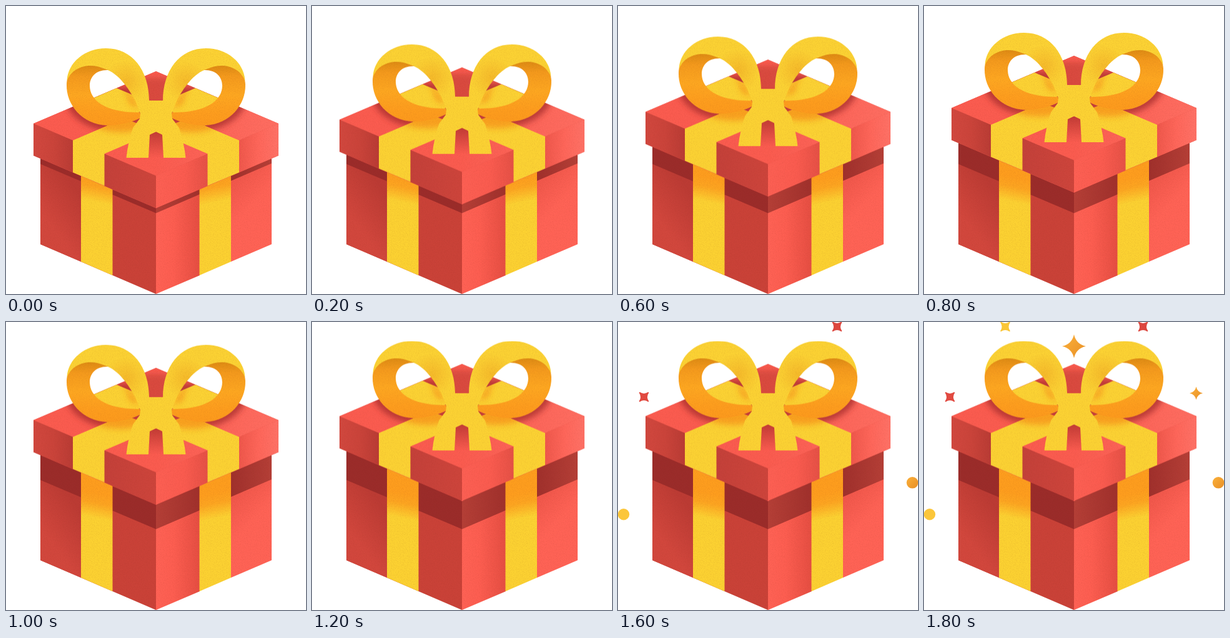
Animation, 480 px wide and 463 px high, one loop 2000 ms. Source, as an HTML page:

```html
<!DOCTYPE html>
<html lang="en">
<head>
<meta charset="utf-8">
<title>Gift box</title>
<style>
html, body { margin: 0; width: 100%; height: 100%; overflow: hidden; background: #fff; }
svg { display: block; width: 480px; height: 463px; }
.lid { animation: lift 2s infinite; }
.spark { animation: 2s step-end infinite; }
.a { animation-name: show-a; }
.b { animation-name: show-b; }
.c { animation-name: show-c; }
@keyframes lift {
  0% { transform: translateY(0); animation-timing-function: steps(6, end); }
  60%, 100% { transform: translateY(-37.5px); }
}
@keyframes show-a { 0% { opacity: 0; } 70%, 100% { opacity: 1; } }
@keyframes show-b { 0% { opacity: 0; } 80%, 100% { opacity: 1; } }
@keyframes show-c { 0% { opacity: 0; } 90%, 100% { opacity: 1; } }
</style>
</head>
<body>
<svg viewBox="0 0 480 463" xmlns="http://www.w3.org/2000/svg">
  <defs>
    <filter id="grain" filterUnits="userSpaceOnUse" x="0" y="0" width="480" height="463" color-interpolation-filters="sRGB">
      <feTurbulence type="fractalNoise" baseFrequency=".8" numOctaves="2" seed="4"/>
      <feColorMatrix values="0 0 0 0 .45  0 0 0 0 .15  0 0 0 0 .08  .25 0 0 0 -.11"/>
      <feComposite in2="SourceAlpha" operator="in" result="specks"/>
      <feMerge><feMergeNode in="SourceGraphic"/><feMergeNode in="specks"/></feMerge>
    </filter>
    <filter id="soft" x="-30%" y="-30%" width="160%" height="160%"><feGaussianBlur stdDeviation="5"/></filter>

    <linearGradient id="bodyL" gradientUnits="userSpaceOnUse" x1="66" y1="345" x2="120" y2="305">
      <stop stop-color="#d2473d"/><stop offset="1" stop-color="#bc3b34"/>
    </linearGradient>
    <linearGradient id="bodyR" gradientUnits="userSpaceOnUse" x1="240" y1="0" x2="310" y2="0">
      <stop stop-color="#ff6255"/><stop offset=".4" stop-color="#fd5e51"/><stop offset="1" stop-color="#e64e42"/>
    </linearGradient>
    <linearGradient id="bodyEnd" gradientUnits="userSpaceOnUse" x1="360" y1="290" x2="392" y2="322">
      <stop stop-color="#f2584c"/><stop offset="1" stop-color="#ff6356"/>
    </linearGradient>
    <linearGradient id="band" gradientUnits="userSpaceOnUse" x1="240" y1="0" x2="425" y2="0">
      <stop stop-color="#b53f37"/><stop offset=".38" stop-color="#a0302c"/>
      <stop offset=".65" stop-color="#a0302c"/><stop offset="1" stop-color="#b53f37"/>
    </linearGradient>
    <linearGradient id="strip" gradientUnits="userSpaceOnUse" x1="140" y1="274" x2="132" y2="313">
      <stop stop-color="#fe9e1e"/><stop offset=".4" stop-color="#fda621"/><stop offset="1" stop-color="#fcd232"/>
    </linearGradient>
    <linearGradient id="lidL" gradientUnits="userSpaceOnUse" x1="44" y1="0" x2="107" y2="0">
      <stop stop-color="#d2483f"/><stop offset=".5" stop-color="#cb443b"/><stop offset="1" stop-color="#ba3c35"/>
    </linearGradient>
    <linearGradient id="lidFrontL" gradientUnits="userSpaceOnUse" x1="157" y1="0" x2="240" y2="0">
      <stop stop-color="#c4413a"/><stop offset="1" stop-color="#ce453c"/>
    </linearGradient>
    <linearGradient id="lidFrontR" gradientUnits="userSpaceOnUse" x1="240" y1="0" x2="323" y2="0">
      <stop stop-color="#fd6054"/><stop offset=".55" stop-color="#fb5c50"/><stop offset="1" stop-color="#e65146"/>
    </linearGradient>
    <linearGradient id="lidR" gradientUnits="userSpaceOnUse" x1="373" y1="0" x2="436" y2="0">
      <stop stop-color="#f0584c"/><stop offset=".5" stop-color="#ff675b"/><stop offset="1" stop-color="#ff7267"/>
    </linearGradient>
    <linearGradient id="top" gradientUnits="userSpaceOnUse" x1="44" y1="0" x2="436" y2="0">
      <stop stop-color="#fb5c50"/><stop offset=".5" stop-color="#fb5c50"/><stop offset="1" stop-color="#ff6e62"/>
    </linearGradient>
    <linearGradient id="notch" gradientUnits="userSpaceOnUse" x1="0" y1="200" x2="0" y2="244">
      <stop stop-color="#c03a34"/><stop offset="1" stop-color="#fb5c50"/>
    </linearGradient>
    <linearGradient id="inner" gradientUnits="userSpaceOnUse" x1="0" y1="94" x2="0" y2="192">
      <stop stop-color="#dc8a13"/><stop offset=".2" stop-color="#f59b1d"/><stop offset=".5" stop-color="#fea821"/>
      <stop offset=".8" stop-color="#fe9e1e"/><stop offset="1" stop-color="#fd9b1d"/>
    </linearGradient>
    <radialGradient id="outer" gradientUnits="userSpaceOnUse" cx="192" cy="122" r="34">
      <stop stop-color="#f6bb2a"/><stop offset="1" stop-color="#fcd334"/>
    </radialGradient>
    <linearGradient id="gold" x1="0" y1="0" x2="1" y2="1">
      <stop stop-color="#fbb03a"/><stop offset="1" stop-color="#e88f26"/>
    </linearGradient>
    <clipPath id="topClip"><path d="M240 105 436 189 240 273 44 189Z"/></clipPath>
    <clipPath id="stripClip"><path d="M107 216 303 132 353 153.5 157.5 237.5ZM373 216 177 132 127 153.5 322.5 237.5Z"/></clipPath>

    <g id="loop">
      <path fill="url(#inner)" d="M97 126C98 96 132 84 172 104C147 99 134 112 134 128C134 152 160 172 214 171L217 179C204 186 184 192 161 192C122 190 96 159 97 126Z"/>
      <path fill="url(#outer)" d="M97.5 120C99 91 126 68 160 68C202 68 229 103 229 153L208 154C196 132 180 108 158 101C136 91 108 95 97.5 120Z"/>
    </g>
    <path id="star" d="M0-10Q1.8-1.8 10 0Q1.8 1.8 0 10Q-1.8 1.8-10 0Q-1.8-1.8 0-10Z"/>
    <path id="cross" stroke-width="1.5" stroke-linejoin="round" d="M-7-7Q0-2.4 7-7Q2.4 0 7 7Q0 2.4-7 7Q-2.4 0-7-7Z"/>
  </defs>

  <g filter="url(#grain)">
    <path fill="#ca4238" d="M55 200 240 280V463L55 383Z"/>
    <path fill="url(#bodyL)" d="M55 200 120 228V411L55 383Z"/>
    <path fill="url(#bodyR)" d="M240 280 310 250V433L240 463Z"/>
    <path fill="url(#bodyEnd)" d="M360 228 425 200V383L360 411Z"/>
    <path fill="#9b2c2a" d="M55 200 240 280V333L55 254Z"/>
    <path fill="url(#band)" d="M240 280 425 200V253L240 333Z"/>
    <path id="ribbon" fill="url(#strip)" d="M120 228 170.5 250V433L120 411Z"/>
    <use href="#ribbon" transform="matrix(-1 0 0 1 480 0)"/>
  </g>

  <g class="lid">
    <g filter="url(#grain)">
      <path fill="#e8544a" d="M240 105 436 189V240.5L240 325 44 240.5V189Z"/>
      <path fill="url(#top)" d="M240 105 436 189 240 273 44 189Z"/>
      <g clip-path="url(#topClip)" fill="#a92f2c" filter="url(#soft)">
        <path id="shade" opacity=".75" d="M94 150C100 178 130 200 172 202L225 185 200 130 110 130Z"/>
        <use href="#shade" transform="matrix(-1 0 0 1 480 0)"/>
        <path opacity=".4" d="M194 115H286L270 165H210Z"/>
      </g>
      <path fill="url(#notch)" d="M226 200H254V244H226Z"/>
      <path fill="url(#lidL)" d="M44 189 107 216V267.5L44 240.5Z"/>
      <path fill="url(#lidFrontL)" d="M157 237.5 240 273V325L157 289Z"/>
      <path fill="url(#lidFrontR)" d="M240 273 323 237.5V289L240 325Z"/>
      <path fill="url(#lidR)" d="M373 216 436 189V240.5L373 267.5Z"/>
      <path fill="#fcd334" d="M107 216 303 132 353 153.5 157.5 237.5V289L107 267.5ZM373 216 177 132 127 153.5 322.5 237.5V289L373 267.5Z"/>
      <g clip-path="url(#stripClip)">
        <g fill="#f99a1f" opacity=".85" filter="url(#soft)">
          <ellipse id="tint" cx="184" cy="190" rx="40" ry="13"/>
          <use href="#tint" transform="matrix(-1 0 0 1 480 0)"/>
          <path d="M186 120 214 165 198 158ZM294 120 266 165 282 158Z"/>
        </g>
      </g>
      <use href="#loop"/>
      <use href="#loop" transform="matrix(-1 0 0 1 480 0)"/>
      <path fill="#fcd334" d="M207 152H273L265 173 266 181 277 196C282 212 286 228 287.5 244H252L250 207 240 202 230 207 228 244H192.5C194 228 198 212 203 196L214 181 215 173Z"/>
    </g>
  </g>

  <g class="spark a">
    <use href="#cross" x="41.5" y="120.5" fill="#e14a41" stroke="#e14a41"/>
    <circle cx="471" cy="258.3" r="9.3" fill="url(#gold)"/>
  </g>
  <g class="spark b">
    <circle cx="9" cy="309.3" r="9.2" fill="#fbc63a"/>
    <use href="#cross" x="350.5" y="7.5" fill="#dc473f" stroke="#dc473f"/>
  </g>
  <g class="spark c">
    <use href="#cross" x="130" y="7.5" fill="#fac637" stroke="#fac637"/>
    <use href="#star" transform="translate(240 39) scale(1.9)" fill="url(#gold)"/>
    <use href="#star" transform="translate(435.5 114.5) scale(1.05)" fill="url(#gold)"/>
  </g>
</svg>
</body>
</html>
```
